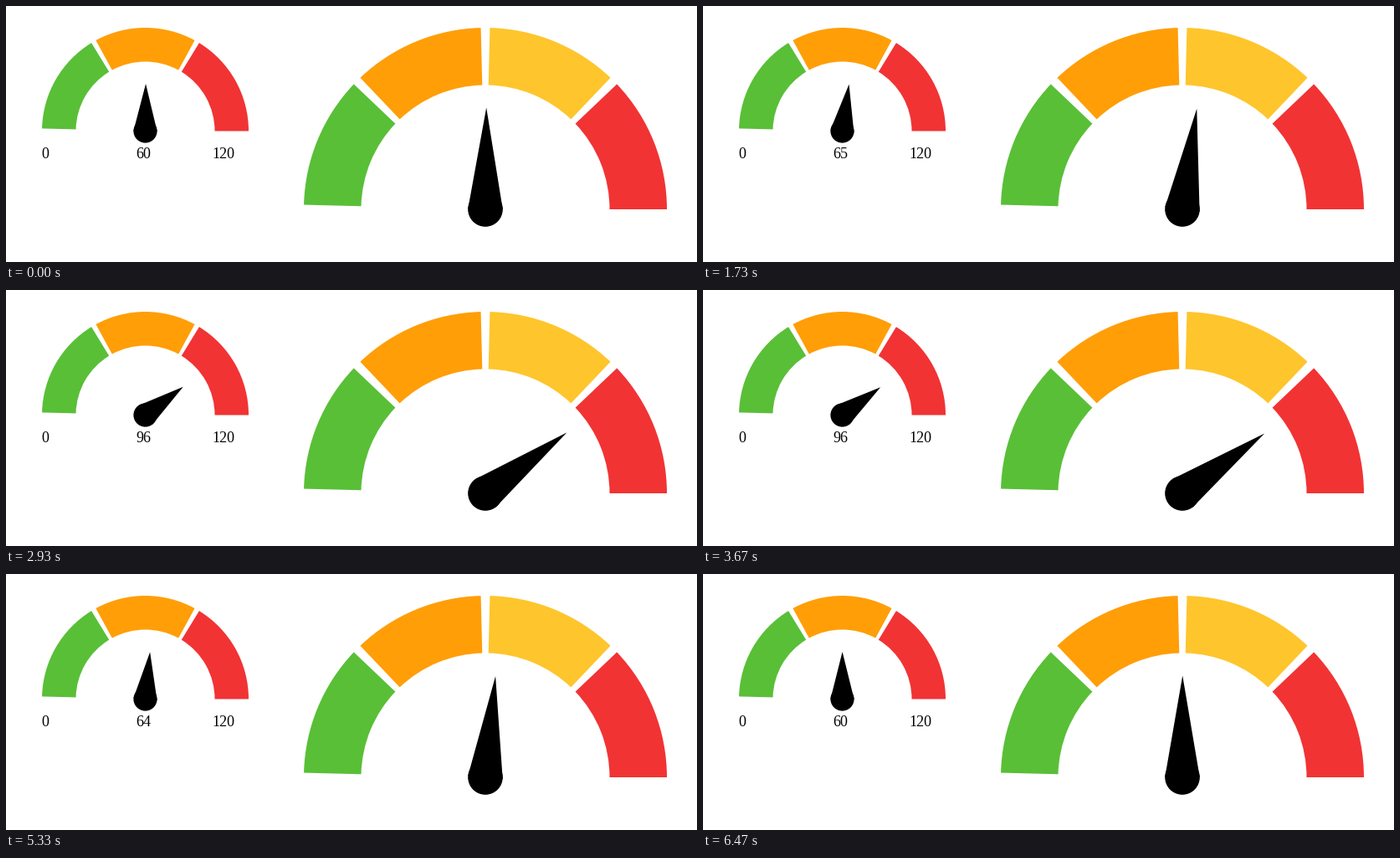
These frames come from a looping animation (826x306 px, 6.54 s). A matplotlib script:

```python
import matplotlib.pyplot as plt
from matplotlib.animation import FuncAnimation
from matplotlib.patches import Circle, Polygon, Wedge
import numpy as np

WIDTH, HEIGHT, DPI = 826, 306, 64
LOOP_MS, TICK_MS = 6540, 20
STEP_MS = 200 / 3            # the needle is redrawn 15 times a second
LAST_STEP = 97

LOW, HIGH, FULL = 60, 96, 120
SWEEP_MS = 2000
SWEEPS = [(-1314, HIGH, LOW), (1686, LOW, HIGH), (4686, HIGH, LOW)]

GREEN, ORANGE, YELLOW, RED = "#59bf37", "#ff9e07", "#fec52c", "#f13334"
PAD = np.degrees(0.025)

fig = plt.figure(figsize=(WIDTH / DPI, HEIGHT / DPI), dpi=DPI, facecolor="white")
ax = fig.add_axes([0, 0, 1, 1])
ax.set_xlim(0, WIDTH)
ax.set_ylim(HEIGHT, 0)
ax.axis("off")


class Gauge:
    def __init__(self, center, outer, inner, colors, length, hub):
        self.center = np.array(center)
        self.length, self.hub = length, hub
        span = 180 / len(colors)
        for i, color in enumerate(colors):
            start = 180 + i * span + PAD
            end = 360 if i == len(colors) - 1 else 180 + (i + 1) * span - PAD
            ax.add_patch(Wedge(center, outer, start, end, width=outer - inner,
                               facecolor=color, linewidth=0))
        ax.add_patch(Circle(center, hub, facecolor="black", linewidth=0))
        self.needle = ax.add_patch(Polygon(self.outline(LOW), facecolor="black",
                                           linewidth=0))

    def outline(self, value):
        angle = np.pi * value / FULL
        forward = -np.array([np.cos(angle), np.sin(angle)])
        side = np.array([-forward[1], forward[0]]) * self.hub
        return [self.center - side, self.center + forward * self.length,
                self.center + side]

    def point_at(self, value):
        self.needle.set_xy(self.outline(value))


def label(x, text):
    return ax.text(x, 182, text, family="Liberation Serif",
                   fontsize=18 * 72 / DPI, color="black", va="baseline")


def value_at(ms):
    start, old, new = [s for s in SWEEPS if s[0] <= ms][-1]
    p = (ms - start) / SWEEP_MS
    eased = 1 - 2 ** (-10 * p) if p < 1 else 1   # exponential ease-out
    return old + (new - old) * eased


gauges = [
    Gauge((166.5, 149.5), 123.5, 83, [GREEN, ORANGE, RED], 56.5, 14.1),
    Gauge((573, 243), 217, 148.5, [GREEN, ORANGE, YELLOW, RED], 121.5, 20.8),
]
label(42.6, "0")
label(246.2, str(FULL))
reading = label(155, str(LOW))


def update(tick):
    ms = tick * TICK_MS + TICK_MS / 2
    step = min(int((ms + 5) / STEP_MS), LAST_STEP)
    value = value_at(step * STEP_MS)
    for gauge in gauges:
        gauge.point_at(value)
    reading.set_text(f"{value:.0f}")
    return [gauge.needle for gauge in gauges] + [reading]


anim = FuncAnimation(fig, update, frames=LOOP_MS // TICK_MS, interval=TICK_MS,
                     repeat=True, repeat_delay=0)
plt.show()
```
